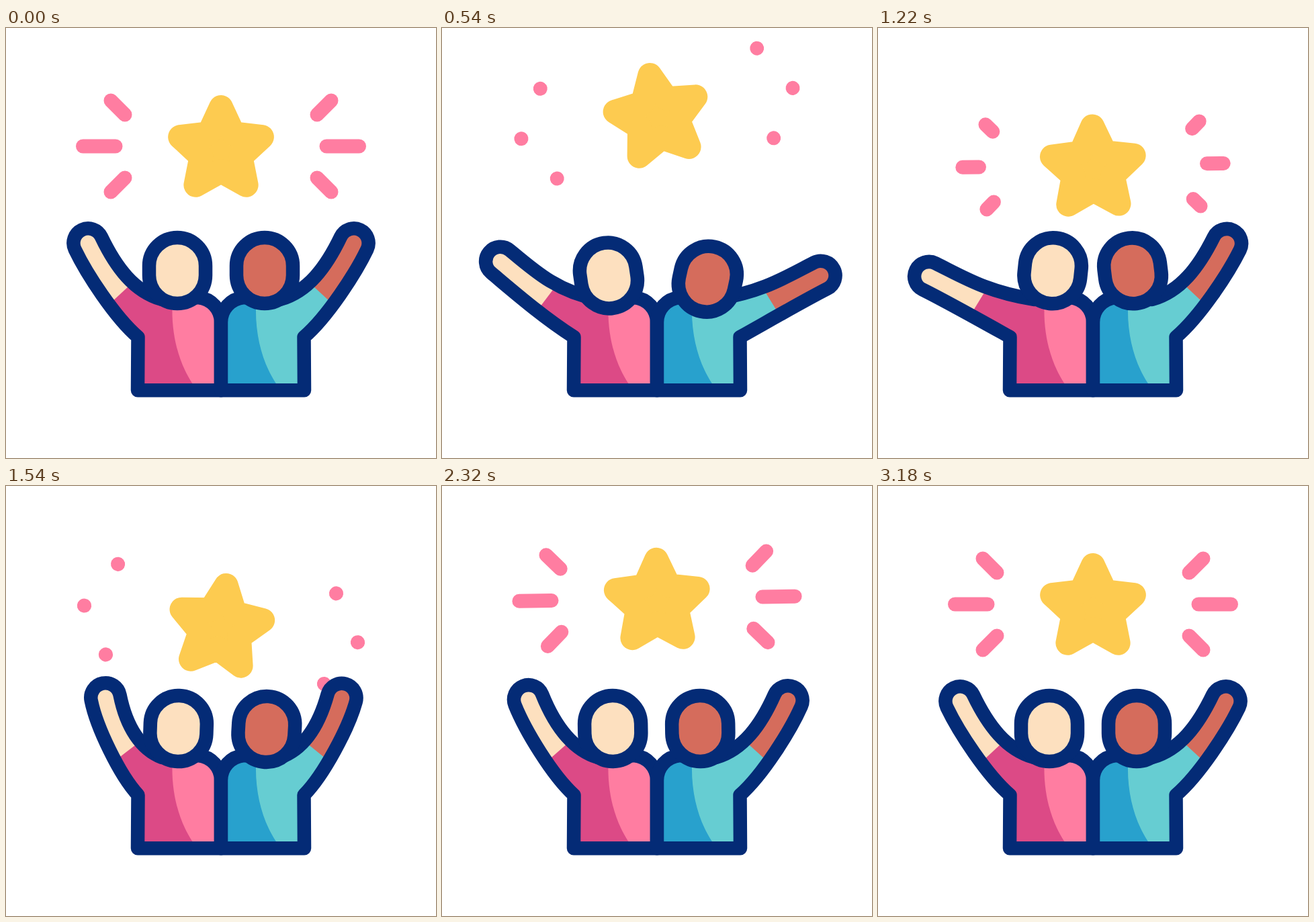
An HTML page that plays this animation: 640 by 640 pixels, repeating every 3.36 s.

```html
<!DOCTYPE html>
<html lang="en">
<head>
<meta charset="utf-8">
<title>Friends cheering under a star</title>
<style>
  html, body { margin: 0; width: 100%; height: 100%; overflow: hidden; background: #fff; }
  svg { display: block; width: 100vw; height: 100vh; }
  .ink { stroke: #042b76; stroke-width: 20.5; stroke-linejoin: round; stroke-linecap: round; }
  .star { fill: #fdcb50; stroke: #fdcb50; stroke-width: 36; stroke-linejoin: round; }
  .ray { stroke: #ff7da1; stroke-width: 21; stroke-linecap: round; }
</style>
</head>
<body>
<svg id="stage" viewBox="0 0 640 640"></svg>
<script>
const LOOP = 3360, STEP = 20, TRIM = 530;
const stage = document.getElementById('stage');

function set(el, attrs) {
  for (const k in attrs) el.setAttribute(k, attrs[k]);
}
function add(parent, tag, attrs = {}) {
  const el = document.createElementNS('http://www.w3.org/2000/svg', tag);
  set(el, attrs);
  return parent.appendChild(el);
}

const lerp = (a, b, u) => a + (b - a) * u;
const ease = u => (1 - Math.cos(Math.PI * Math.min(1, Math.max(0, u)))) / 2;
const ramp = (t, from, length) => ease((t - from) / length);
const rad = deg => deg * Math.PI / 180;
const move = (p, deg, d) => [p[0] + d * Math.cos(rad(deg)), p[1] + d * Math.sin(rad(deg))];

// Swing from value to value, reaching each at its time
function track(times, values) {
  return t => {
    let i = 1;
    while (i < times.length - 1 && t > times[i]) i++;
    return lerp(values[i - 1], values[i], ramp(t, times[i - 1], times[i] - times[i - 1]));
  };
}

// Alternating swings that die out: starts and ends at zero
function settle(times, first, decay) {
  const last = times.length - 1;
  return track(times, times.map((_, i) => i % last ? first * (-decay) ** (i - 1) : 0));
}

// Point at u on a cubic curve
function along([a, b, c, d], u) {
  const v = 1 - u;
  return [0, 1].map(k => v * v * v * a[k] + 3 * v * v * u * b[k] + 3 * v * u * u * c[k] + u * u * u * d[k]);
}

// Star and rays
const sky = add(stage, 'g');
const starPoints = Array.from({ length: 10 }, (_, i) => move([0, 6], i * 36 - 90, i % 2 ? 30.8 : 64));
add(sky, 'polygon', { class: 'star', points: starPoints.join(' ') });

const rays = [];
for (const side of [-1, 1]) {
  for (const row of [-1, 0, 1]) {
    const inner = [side * (row ? 143 : 157), row * 47];
    const outer = [side * (row ? 164 : 205.5), row * 68];
    rays.push({ el: add(sky, 'line', { class: 'ray' }), inner, outer });
  }
}
const lift = settle([0, 620, 1380, 2070, 2640, 3180], -51, 0.74);
const turn = track([0, 690, 1720, 2070, 2660, 3180], [0, -11.9, 9.2, -2.6, 1.6, 0]);

// Visible part of each ray as [start, end], or null when hidden
function rayTrim(t) {
  if (t < 640) return [ramp(t, 0, TRIM), 1];
  if (t >= 860 && t < 1660) return [ramp(t, 1040, TRIM), ramp(t, 860, TRIM)];
  if (t >= 1820) return [0, ramp(t, 1820, TRIM)];
  return null;
}

function drawSky(t) {
  set(sky, { transform: `translate(320 ${176 + lift(t)}) rotate(${turn(t)})` });
  const trim = rayTrim(t);
  for (const { el, inner, outer } of rays) {
    el.style.display = trim ? '' : 'none';
    if (!trim) continue;
    const [x1, x2] = trim.map(u => lerp(inner[0], outer[0], u));
    const [y1, y2] = trim.map(u => lerp(inner[1], outer[1], u));
    set(el, { x1, y1, x2, y2 });
  }
}

// Both friends wave with the same swings, each in their own time
const WAVE = [69, 2, 91.5, 43, 75, 69];

// A person, drawn as the left one; the right one is mirrored
function person(id, { mirror, sleeve, chest, skin, fold, waveTimes, nod }) {
  const g = add(stage, 'g', mirror ? { transform: 'translate(640 0) scale(-1 1)' } : {});
  const clip = add(add(g, 'clipPath', { id }), 'path');
  const fill = add(g, 'g', { 'clip-path': `url(#${id})` });
  add(fill, 'rect', { width: 640, height: 640, fill: sleeve });
  add(fill, 'path', { d: `${fold} V560 H340 V380 Z`, fill: chest });
  const forearm = add(fill, 'polygon', { fill: skin });
  const outline = add(g, 'path', { class: 'ink', fill: 'none' });
  const head = add(g, 'rect', { class: 'ink', x: 213, y: 312, width: 84, height: 98, rx: 42, fill: skin });
  const wave = track(waveTimes, WAVE);

  return t => {
    // The hand swings on a circle; the arm's tilt follows it
    const swing = wave(t), tilt = 14 + 0.73 * swing, bend = tilt - 25;
    const hand = move([150, 392.5], 180 + swing, 77.5);
    const upper = move(hand, tilt - 90, 21.8), lower = move(hand, tilt + 90, 21.8);
    const top = [upper, move(upper, tilt, 50), [160 + 0.77 * bend, 392], [232, 404]];
    const under = [lower, move(lower, tilt, 40), [142 + 0.5 * bend, 430], [196.5, 460]];
    const d = `M196 539.3 L${under[3]} C${under[2]} ${under[1]} ${lower}
      A21.8 21.8 0 0 1 ${upper} C${top.slice(1).join(' ')}
      L286 401 C306 403 320 419 320 438 V539.3 Z`;
    set(clip, { d });
    set(outline, { d });

    // Skin fills everything beyond the cuff
    const p = along(top, 0.6), q = along(under, 0.6);
    const across = Math.atan2(q[1] - p[1], q[0] - p[0]) * 180 / Math.PI;
    const a = move(p, across, -20), b = move(q, across, 20);
    set(forearm, { points: [a, b, move(b, across + 90, 150), move(a, across + 90, 150)].join(' ') });

    const lean = nod(t), dip = 1.2 * Math.max(0, -lean - 2.5);
    set(head, { transform: `translate(0 ${dip}) rotate(${lean} 255 410)` });
  };
}

const drawLeft = person('left', {
  sleeve: '#dc4a86', chest: '#ff7da1', skin: '#fde0bf',
  fold: 'M247.5 380 V415 C246.5 460 258 500 278 530',
  waveTimes: [0, 1080, 1600, 1980, 2360, 3000],
  nod: settle([0, 600, 1260, 1900, 2500], -8.5, 0.72)
});
const drawRight = person('right', {
  mirror: true, sleeve: '#66cdd2', chest: '#28a1cd', skin: '#d56c5c',
  fold: 'M268 380 V415 C269 460 257.5 500 237.5 530',
  waveTimes: [0, 800, 1440, 1800, 2080, 2500],
  nod: settle([0, 600, 1180, 1620, 2060, 2500], -12.5, 0.58)
});

function draw(t) {
  drawSky(t);
  drawLeft(t);
  drawRight(t);
}

const start = performance.now();
function frame() {
  const t = (performance.now() - start) % LOOP;
  draw(Math.floor(t / STEP) * STEP);
  requestAnimationFrame(frame);
}
draw(0);
requestAnimationFrame(frame);
</script>
</body>
</html>
```
